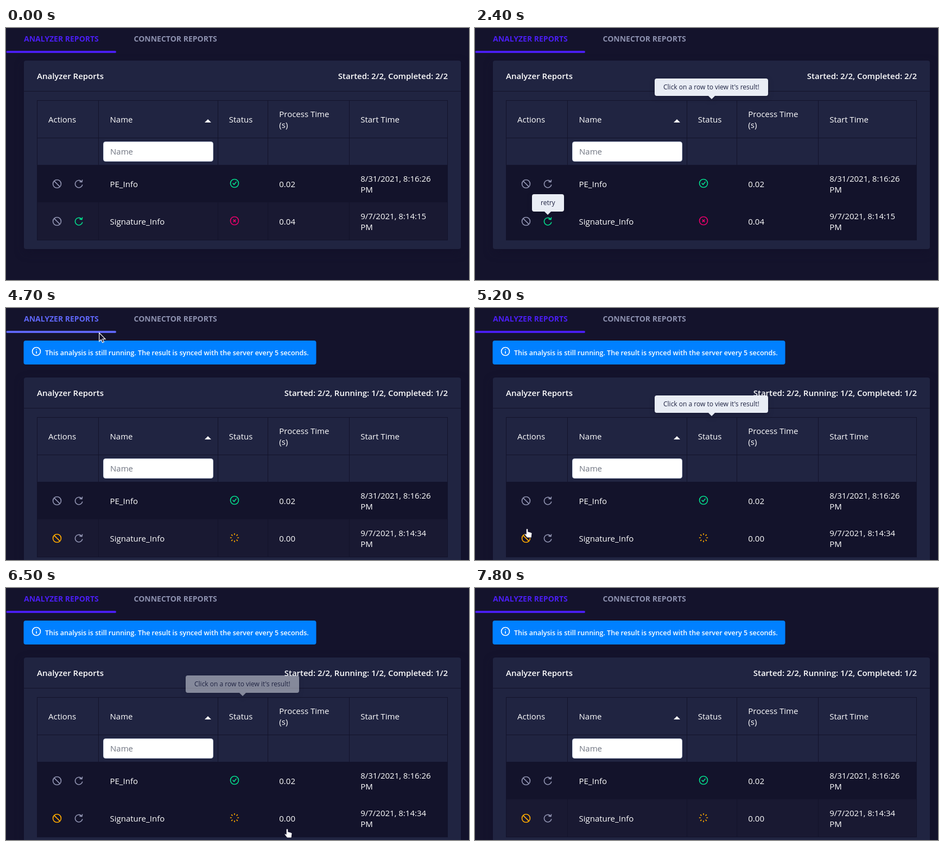
An HTML page that plays this animation: 853 by 464 pixels, repeating every 8300 ms.

```html
<!DOCTYPE html>
<html lang="en">
<head>
<meta charset="utf-8">
<title>Analyzer reports</title>
<style>
html, body { margin: 0; height: 100%; overflow: hidden; background: #14132c; }
svg { display: block; }
text { font: 15px "Open Sans", sans-serif; fill: #fff; }
.semi { font-weight: 600; }
.tab { font-size: 14px; font-weight: 700; }
.end { text-anchor: end; }
.alert { font-size: 12.5px; font-weight: 600; }
.tip { filter: drop-shadow(0 3px 5px #0c0b2055); }
.tip path { fill: #e9edf5; }
.tip text { font-size: 12px; fill: #1c2140; }
.icon { fill: none; stroke: currentColor; stroke-width: 2; stroke-linecap: round; stroke-linejoin: round; }
.gray { color: #8f92b0; }
.green { color: #04d98b; }
.red { color: #e4006a; }
.orange { color: #ffaa00; }
.white { color: #fff; }
</style>
</head>
<body>
<svg width="853" height="464" viewBox="0 0 853 464">
  <defs>
    <g id="ban" class="icon" transform="scale(.833)"><circle r="9"/><path d="M-6.2-6.2L6.2 6.2"/></g>
    <g id="redo" class="icon" transform="scale(.833)"><path d="M8 2.4A8.1 8.1 0 1 1 5.8-5.6M2.5-4.7L7-4L7.9-8.3"/></g>
    <g id="ok" class="icon" transform="scale(.833)"><circle r="9"/><path d="M-3.4.2L-.9 2.8L3.7-3"/></g>
    <g id="fail" class="icon" transform="scale(.833)"><circle r="9"/><path d="M-2.3-2.3L2.3 2.3M-2.3 2.3L2.3-2.3"/></g>
    <g id="info" class="icon" transform="scale(.833)"><circle r="9"/><path d="M0-4V-3.9M0 0V4"/></g>
    <path id="spoke" d="M0-7V-9"/>
    <g id="spin" class="icon" transform="scale(.833)"></g>
  </defs>

  <text id="tab" class="tab" x="33" y="25">ANALYZER REPORTS</text>
  <text class="tab" x="235.5" y="25" style="fill:#8c90ae">CONNECTOR REPORTS</text>
  <rect id="bar" x=".5" y="42" width="202.5" height="4" rx="2"/>

  <g id="alert">
    <rect x="32.5" y="60" width="539" height="44" rx="4" fill="#0080ff"/>
    <use href="#info" class="white" transform="translate(56 80)"/>
    <text class="alert" x="72" y="87">This analysis is still running. The result is synced with the server every 5 seconds.</text>
  </g>

  <g id="card">
    <rect x="33" y="60" width="805" height="347" rx="4" fill="#202441" style="filter:drop-shadow(0 6px 8px #110f2899)"/>
    <text class="semi" x="57" y="94">Analyzer Reports</text>
    <text id="summary" class="semi end" x="814" y="94"></text>
    <rect x="57" y="252" width="757" height="69" fill="#13132b"/>
    <rect id="row2" x="57" y="321" width="757" height="70"/>
    <path id="grid" stroke="#13132b"/>

    <text x="78" y="174">Actions</text>
    <text x="191.5" y="174">Name</text>
    <path d="M366 174L372 168L378 174Z" fill="#fff"/>
    <text x="410.8" y="174">Status</text>
    <text x="503.3" y="164">Process Time</text>
    <text x="503.3" y="184">(s)</text>
    <text x="653.2" y="174">Start Time</text>
    <rect x="179.5" y="209.5" width="202" height="36" rx="4" fill="#fff" stroke="#c5cee0"/>
    <text x="192" y="233" style="fill:#6f7480">Name</text>

    <use href="#ban" class="gray" transform="translate(94 287)"/>
    <use href="#redo" class="gray" transform="translate(134 287)"/>
    <text x="191.5" y="293">PE_Info</text>
    <use href="#ok" class="green" transform="translate(421 286)"/>
    <text x="503.3" y="293">0.02</text>
    <text x="653.2" y="283">8/31/2021, 8:16:26</text>
    <text x="653.2" y="303">PM</text>

    <use id="kill" href="#ban" transform="translate(94 356)"/>
    <use id="retry" href="#redo" transform="translate(134 356)"/>
    <text x="191.5" y="362">Signature_Info</text>
    <use id="status" transform="translate(421 355)"/>
    <text id="took" x="503.3" y="362"></text>
    <text id="start" x="653.2" y="352"></text>
    <text x="653.2" y="372">PM</text>

    <g id="rowTip" class="tip">
      <path d="M335 93H536a4 4 0 0 1 4 4V121a4 4 0 0 1-4 4H442L436 131L430 125H335a4 4 0 0 1-4-4V97a4 4 0 0 1 4-4Z"/>
      <text x="347" y="113">Click on a row to view it's result!</text>
    </g>
    <g id="retryTip" class="tip">
      <path d="M109 306H160a4 4 0 0 1 4 4V334a4 4 0 0 1-4 4H140L134 344L128 338H109a4 4 0 0 1-4-4V310a4 4 0 0 1 4-4Z"/>
      <text x="121" y="326">retry</text>
    </g>
  </g>

  <g id="cursor">
    <path id="arrow" d="M.7.8V16.5L4.3 13.2L6.8 18.7L9.4 17.5L7 12.2H12Z" fill="#15132d" stroke="#fff" stroke-width="1.2"/>
    <path id="hand" d="M-1.8 1.5Q0-.8 1.8 1.5V5.8L7 7.2Q9.2 7.8 9 9.5L8 17H0L-4.8 11Q-5 8.5-1.8 10.5Z" fill="#fff" stroke="#15132d"/>
  </g>
</svg>
<script>
const LOOP = 8300, STEP = 100;
const RESET = 3800, RERUN = 3900; // tooltips cleared, job restarted
const el = Object.fromEntries([...document.querySelectorAll('[id]')].map(e => [e.id, e]));

el.spin.innerHTML = [...Array(8).keys()]
  .map(i => `<use href="#spoke" transform="rotate(${i * 45})"/>`).join('');
el.grid.setAttribute('d', 'M33 116.5H838' +
  [133, 202, 390].map(y => `M57 ${y}.5H814`).join('') +
  [57, 170, 390, 482, 632, 813].map(x => `M${x}.5 133V391`).join(''));

// Each visit: the cursor glides in, rests, then leaves; tip is when the row tooltip is wanted
const visits = [
  { come: [700, 1200], go: [2200, 2200], end: 2400, from: [745, 427], rest: [136, 361], to: [152, 48], tip: [800, RESET], bend: 0 },
  { come: [4700, 5300], go: [5400, 6100], end: 6200, from: [171, 45], rest: [94, 416], to: [150, 30], tip: [4900, 5700], bend: -42 },
  { come: [6400, 7000], go: [7300, 7700], end: 7800, from: [560, 452], rest: [422, 424], to: [178, 5], tip: [6400, 7400], bend: 0 }
];

const clamp = u => Math.max(0, Math.min(1, u));
const mix = (a, b, u) => a.map((v, i) => v + (b[i] - v) * u);
const span = ([a, b], t) => a === b ? 1 : clamp((t - a) / (b - a));
const easeOut = u => 1 - (1 - u) ** 2;
const tipAlpha = ([on, off], t) => Math.min(clamp((t - on) / 200), clamp(1 - (t - off) / 150));

function cursorAt(v, t) {
  if (t < v.go[0]) return mix(v.from, v.rest, easeOut(span(v.come, t)));
  const u = span(v.go, t), [x, y] = mix(v.rest, v.to, u);
  return [x + v.bend * Math.sin(Math.PI * u), y];
}

const show = (e, on) => e.setAttribute('visibility', on ? 'visible' : 'hidden');
const paint = (e, color) => e.setAttribute('class', color);

function draw(t) {
  const running = t >= RERUN, shift = running ? 68 : 0;
  const visit = visits.find(v => t >= v.come[0] && t < v.end);
  const [x, y] = visit ? cursorAt(visit, t) : [-99, -99];
  const overRows = x > 57 && x < 814 && y >= 252 + shift && y < 391 + shift;
  const overRow2 = overRows && y >= 321 + shift;
  const picked = overRow2 || (t >= 900 && t < RESET);
  const tabColor = x > 0 && x < 203 && y <= 46 ? '#5f66f8' : '#4a1df2';

  el.tab.style.fill = el.bar.style.fill = tabColor;
  show(el.alert, running);
  el.card.setAttribute('transform', `translate(0 ${shift})`);
  el.summary.textContent = running ? 'Started: 2/2, Running: 1/2, Completed: 1/2' : 'Started: 2/2, Completed: 2/2';
  el.row2.style.fill = picked ? '#13132b' : '#191932';
  paint(el.kill, running ? 'orange' : 'gray');
  paint(el.retry, running ? 'gray' : 'green');
  paint(el.status, running ? 'orange' : 'red');
  el.status.setAttribute('href', running ? '#spin' : '#fail');
  el.took.textContent = running ? '0.00' : '0.04';
  el.start.textContent = running ? '9/7/2021, 8:14:34' : '9/7/2021, 8:14:15';

  el.rowTip.setAttribute('opacity', Math.max(...visits.map(v => tipAlpha(v.tip, t))));
  show(el.rowTip, running || t < RESET);
  show(el.retryTip, t >= 1400 && t < RESET);
  show(el.cursor, visit);
  show(el.arrow, visit && !overRows);
  show(el.hand, visit && overRows);
  el.cursor.setAttribute('transform', `translate(${Math.round(x)} ${Math.round(y)})`);
}

const begin = performance.now();
function frame() {
  const t = (performance.now() - begin) % LOOP;
  draw(Math.floor(t / STEP) * STEP);
  requestAnimationFrame(frame);
}
frame();
</script>
</body>
</html>
```
